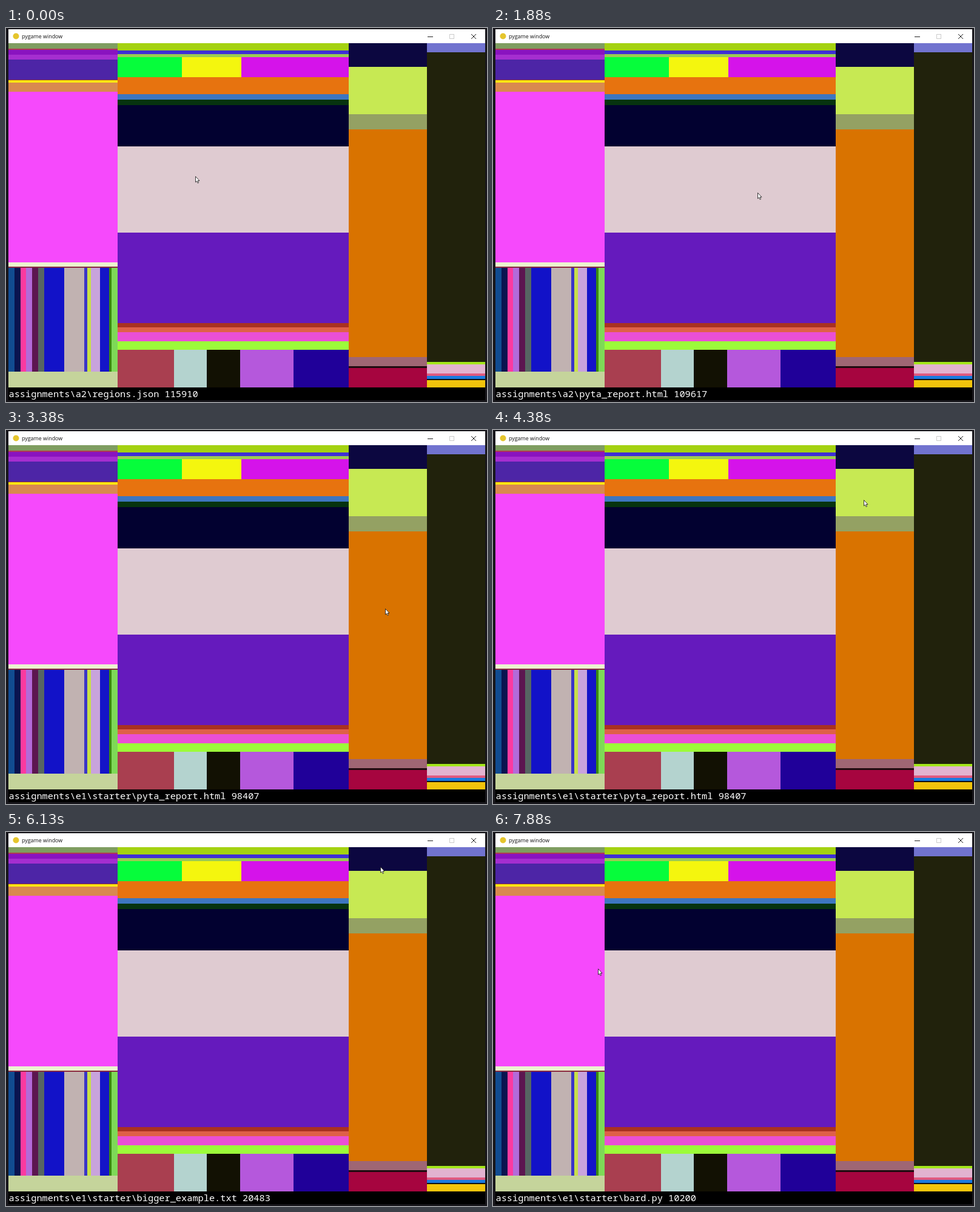
An HTML page with a canvas that plays this animation: 793x616 px, repeating every 8000 ms.

```html
<!DOCTYPE html>
<html lang="en">
<head>
<meta charset="utf-8">
<title>pygame window</title>
<style>
  html, body { margin: 0; width: 100%; height: 100%; overflow: hidden; background: #17161b; }
  canvas { display: block; }
</style>
</head>
<body>
<canvas id="stage" width="793" height="616"></canvas>
<script>
const ctx = document.getElementById('stage').getContext('2d');
const LOOP = 8000, STEP = 125;

function rect(x, y, w, h, color) {
  ctx.fillStyle = color;
  ctx.fillRect(x, y, w, h);
}

// Each band reads "color end", where end is its far edge.
function column(x0, x1, y, bands) {
  for (const band of bands.split(', ')) {
    const [color, end] = band.split(' ');
    rect(x0, y, x1 - x0, end - y, '#' + color);
    y = +end;
  }
}

function row(y0, y1, x, bands) {
  for (const band of bands.split(', ')) {
    const [color, end] = band.split(' ');
    rect(x, y0, end - x, y1 - y0, '#' + color);
    x = +end;
  }
}

function drawTreemap() {
  column(4, 184, 25, '7f9d60 34, b03a50 36, 8a13c0 44, a52ed0 52, 4d25a6 85, 8a3040 86, ' +
    'fce512 90, d9894f 105, f649fc 386, ecf7cf 393, 8b2a40 395, 000000 566, c5d49b 592');
  row(395, 566, 4, '114c91 14, 0a1450 24, fb3aa0 33, b36ad9 43, 5c1650 53, 566662 63, ' +
    '1212c8 96, c1b2b1 129, 3a35c8 134, c8e048 140, c8a3dc 155, 1414c8 170, 3a8a10 174, 7ed957 184');

  column(184, 565, 25, 'a4d211 37, 3f2fd5 43, 9ccb52 48, 000000 81, e7730f 109, 3d76c0 118, ' +
    '06330f 127, 020130 195, dfcbd1 337, 651abd 486, a93121 493, df6048 501, ea4fd5 516, 9cfb3a 530');
  row(48, 81, 184, '06fd3b 290, f4f60e 388, d513ea 565');
  row(530, 592, 184, 'a93f50 277, b4d3cf 331, 121103 386, b558dc 474, 200099 565');

  column(565, 694, 25, '0c0740 64, c7e953 142, 94a163 167, d97300 542, 9f6674 557, 1f0b10 560, a6053f 592');
  column(694, 790, 25, '7173cf 40, 21220c 550, a4e61c 554, e2b3d0 569, e05a80 573, 1a7ae0 578, 101010 580, f2c40c 592');
}

function line(color, ...points) {
  ctx.strokeStyle = color;
  ctx.lineWidth = 1;
  ctx.beginPath();
  for (let i = 0; i < points.length; i += 4) {
    ctx.moveTo(points[i], points[i + 1]);
    ctx.lineTo(points[i + 2], points[i + 3]);
  }
  ctx.stroke();
}

function drawWindow() {
  rect(0, 0, 793, 616, '#17161b');
  rect(4, 2, 786, 23, '#fff');
  ctx.fillStyle = '#e5c52c';
  ctx.beginPath();
  ctx.arc(16.5, 13.5, 5, 0, Math.PI * 2);
  ctx.fill();
  ctx.fillStyle = '#111';
  ctx.font = '8.9px "Open Sans", sans-serif';
  ctx.fillText('pygame window', 26, 17);
  line('#222', 695, 14.5, 704, 14.5, 767, 10, 775, 18, 775, 10, 767, 18);
  ctx.strokeStyle = '#ccc';
  ctx.strokeRect(731.5, 10.5, 7, 7);
}

const labels = [
  [0, 'a2\\regions.json 115910'],
  [1000, 'a2\\pyta_report.html 109617'],
  [2875, 'e1\\starter\\pyta_report.html 98407'],
  [4750, 'e1\\starter\\bigger_example.txt 20483'],
  [6500, 'e1\\starter\\bard.py 10200'],
];

function drawStatus(t) {
  rect(4, 592, 786, 21, '#000');
  const [, path] = labels.findLast(([start]) => t >= start);
  ctx.fillStyle = '#fff';
  ctx.font = '15.3px "Noto Sans Mono", monospace';
  ctx.fillText('assignments\\' + path, 4.5, 608);
}

// time, x, y of the pointer tip
const path = [
  [0, 312, 244], [500, 312, 244], [875, 312, 249], [1500, 312, 249],
  [2375, 626, 305], [3250, 626, 305], [4125, 611, 115], [5500, 611, 115],
  [6250, 617, 52], [7000, 617, 52], [7875, 173, 225], [8000, 173, 225],
];

function pointerAt(t) {
  const i = path.findIndex(([time]) => time > t);
  const [t0, x0, y0] = path[i - 1], [t1, x1, y1] = path[i];
  const u = (t - t0) / (t1 - t0), k = u * u * (3 - 2 * u);
  return [Math.round(x0 + (x1 - x0) * k), Math.round(y0 + (y1 - y0) * k)];
}

const arrow = new Path2D('M.5 .5V10L2.6 8.1 4.1 11.5 5.6 10.8 4.2 7.5H7Z');

function drawPointer(t) {
  ctx.save();
  ctx.translate(...pointerAt(t));
  ctx.fillStyle = '#fff';
  ctx.fill(arrow);
  ctx.strokeStyle = '#111';
  ctx.lineWidth = 0.8;
  ctx.stroke(arrow);
  ctx.restore();
}

function frame(now) {
  const t = Math.floor(now % LOOP / STEP) * STEP;
  drawWindow();
  drawTreemap();
  drawStatus(t);
  drawPointer(t);
  requestAnimationFrame(frame);
}
frame(0);
</script>
</body>
</html>
```
